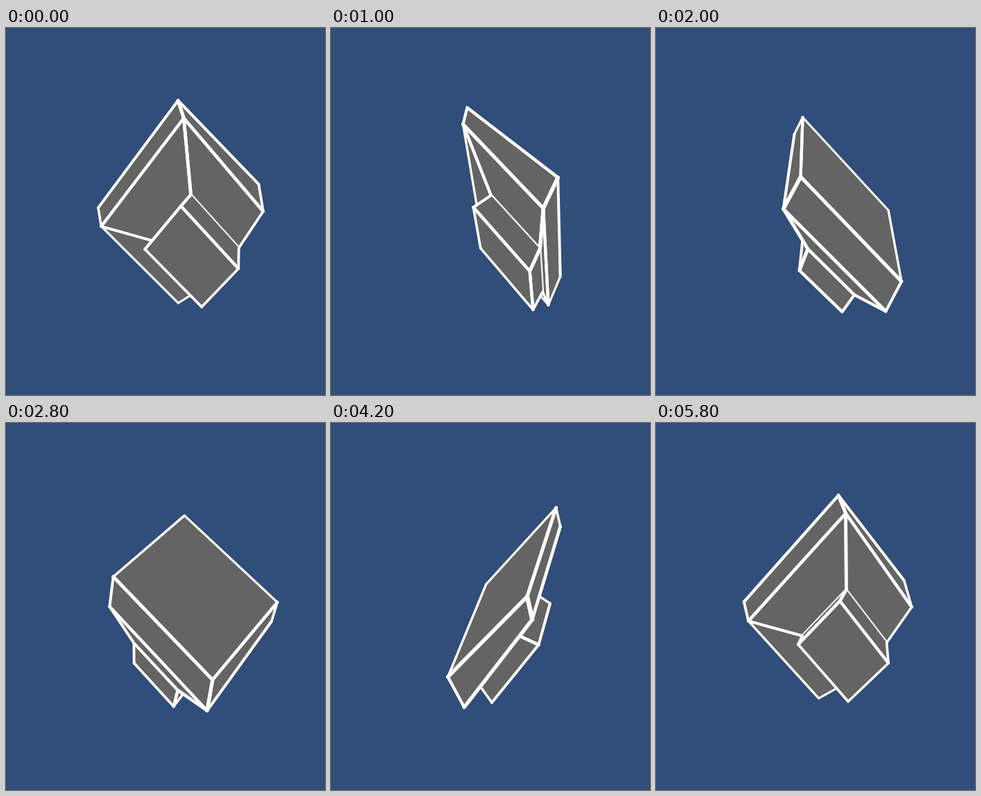
Recreate the animation shown at these times as an HTML page with a canvas. Size 460 by 530 pixels, loop 6 s.

```html
<!DOCTYPE html>
<html lang="en">
<head>
<meta charset="utf-8">
<title>Turning solid</title>
<style>
  html, body { margin: 0; width: 100%; height: 100%; overflow: hidden; background: #314d79; }
  canvas { display: block; }
</style>
</head>
<body>
<canvas id="stage" width="460" height="530"></canvas>
<script>
const ctx = document.getElementById('stage').getContext('2d');
const STEP = 200, STEPS = 30, DEPTH = 820, CX = 260, HORIZON = 300.4;

// Half sides of the slab; the back face leans a little along its second side.
const sideA = [60.7, 70.2, 44.3];
const sideB = [-56, 59.8, 29.5];
const backB = [-58.2, 52.3, 36.8];

// A four-cornered section of the solid: top, right, bottom, left.
function ring(centre, a, b, second = sideB) {
  const signs = [[1, 1], [1, -1], [-1, -1], [-1, 1]];
  return signs.map(([m, n]) =>
    centre.map((c, i) => c + m * a * sideA[i] + n * b * second[i]));
}

const points = [
  ...ring([-12.5, 58.7, -15.3], 0.985, 1, backB),
  ...ring([-8, 24.6, 1.3], 1, 1),
  ...ring([13.4, -12, -2], 0.455, 0.62),
  ...ring([7.8, -32.5, 17.3], 0.42, 0.724)
];

const sides = level => [0, 1, 2, 3].map(i => {
  const a = level * 4 + i, b = level * 4 + (i + 1) % 4;
  return [a, b, b + 4, a + 4];
});
const base = [8, 9, 10, 11];
const body = { faces: [[3, 2, 1, 0], ...sides(0), ...sides(1)], ownsBase: true };
const block = { faces: [...sides(2), [12, 13, 14, 15]], ownsBase: false };

function project([x, y, z], angle) {
  const c = Math.cos(angle), s = Math.sin(angle);
  const scale = DEPTH / (DEPTH - z * c - x * s);
  return { x: CX + (x * c - z * s) * scale, y: HORIZON - y * scale, scale };
}

// Clockwise on screen means the face is turned to the viewer.
function facing(face, p) {
  return face.reduce((sum, a, i) => {
    const b = face[(i + 1) % 4];
    return sum + p[a].x * p[b].y - p[b].x * p[a].y;
  }, 0) > 0;
}

function drawEdge(a, b) {
  ctx.lineWidth = 3.7 * ((a.scale + b.scale) / 2) ** 3;
  ctx.beginPath();
  ctx.moveTo(a.x, a.y);
  ctx.lineTo(b.x, b.y);
  ctx.stroke();
}

function drawPart({ faces, ownsBase }, p) {
  const seen = faces.filter(face => facing(face, p));
  for (const face of seen) {
    ctx.beginPath();
    face.forEach(i => ctx.lineTo(p[i].x, p[i].y));
    ctx.fill();
  }
  for (const face of seen) {
    face.forEach((a, i) => {
      const b = face[(i + 1) % 4];
      const shared = base.includes(a) && base.includes(b);
      if (ownsBase || !shared) drawEdge(p[a], p[b]);
    });
  }
}

function draw(time) {
  const angle = Math.floor(time / STEP) % STEPS / STEPS * 2 * Math.PI;
  const p = points.map(point => project(point, angle));
  ctx.fillStyle = '#314d79';
  ctx.fillRect(0, 0, 460, 530);
  ctx.fillStyle = '#646464';
  ctx.strokeStyle = '#fff';
  ctx.lineCap = 'round';
  const order = facing(base, p) ? [body, block] : [block, body];
  order.forEach(part => drawPart(part, p));
}

const start = performance.now();
function tick() {
  draw(performance.now() - start);
  requestAnimationFrame(tick);
}
tick();
</script>
</body>
</html>
```
